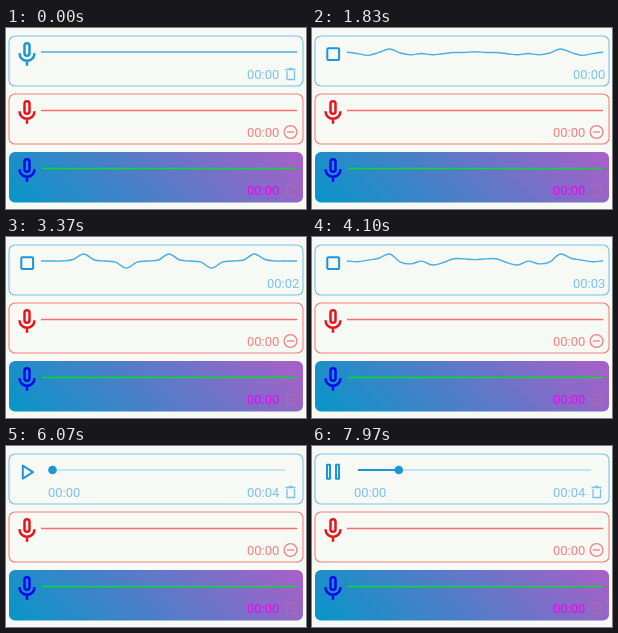
These frames come from a looping animation (300 px wide and 181 px high, 8 s). An HTML page:

```html
<!DOCTYPE html>
<html lang="en">
<head>
<meta charset="utf-8">
<title>Voice recorder</title>
<style>
  html, body { margin: 0; width: 100%; height: 100%; overflow: hidden; background: #f6f9f4; }
  svg { display: block; width: 300px; height: 181px; }
  text { font: 13px Roboto, Arial, sans-serif; fill: var(--soft); }
  .icon { fill: none; stroke: var(--main); stroke-width: 2; }
  .small { fill: none; stroke: var(--soft); stroke-width: 1.3; }
  .line { fill: none; stroke: var(--line); stroke-width: 1.4; }
  .box { fill: none; stroke: var(--soft); stroke-width: 1.1; }
  .blue { --main: #1b97d8; --soft: #7cc2e8; --line: #4aaee0; }
  .red { --main: #e8141c; --soft: #f97f7f; --line: #fa6d6d; }
  .vivid { --main: #0808f0; --soft: #f400f4; --line: #08dc30; }
</style>
</head>
<body>
<svg viewBox="0 0 300 181">
  <defs>
    <linearGradient id="fade" gradientUnits="userSpaceOnUse" x1="64" y1="119" x2="236" y2="-53">
      <stop offset="0" stop-color="#0696c8"/>
      <stop offset="1" stop-color="#aa5fc8"/>
    </linearGradient>
    <g id="mic" class="icon" transform="translate(6 11.5) scale(1.25)">
      <rect x="10" y="3" width="4" height="10" rx="2"/>
      <path d="M6 11a6 6 0 0 0 12 0M12 17v4"/>
    </g>
    <path id="trash" d="M279.5 41.5h10M283 40.5h3.5M281 43v8.5h7.5V43"/>
  </defs>

  <g class="blue">
    <rect class="box" x="3" y="8" width="294" height="50" rx="6"/>
    <use id="idleMic" href="#mic"/>
    <rect id="stop" class="icon" x="15.3" y="20.3" width="11.8" height="11.8" rx="1"/>
    <path id="play" class="icon" d="M16.8 19.6v13L27 26.1z" stroke-linejoin="round"/>
    <path id="pause" class="icon" stroke-width="1.7" stroke-linejoin="round" d="M15 18.8h3v14h-3zM24 18.8h3v14h-3z"/>
    <path id="wave" class="line"/>
    <g id="slider">
      <path d="M46 24H279" stroke="#8fcdec" stroke-width="1.2"/>
      <path id="played" stroke="#1b97d8" stroke-width="2"/>
      <circle id="knob" cy="24" r="4.3" fill="#1b97d8"/>
      <text id="position" x="42" y="51"></text>
    </g>
    <text id="clock" y="51"></text>
    <use id="bin" class="small" href="#trash"/>
  </g>

  <g class="red" transform="translate(0 58)">
    <rect class="box" x="3" y="8" width="294" height="50" rx="6"/>
    <use href="#mic"/>
    <path class="line" d="M35 24.5H291"/>
    <text x="241" y="51">00:00</text>
    <g class="small">
      <circle cx="284.5" cy="46" r="6.4"/>
      <path d="M281 46h7"/>
    </g>
  </g>

  <g class="vivid" transform="translate(0 116)">
    <rect x="3" y="8" width="294" height="50.5" rx="6" fill="url(#fade)"/>
    <use href="#mic"/>
    <path class="line" d="M36 24.5H291"/>
    <text x="241" y="51">00:00</text>
    <use class="small" href="#trash" style="--soft:#b566ae"/>
  </g>
</svg>

<script>
const LOOP = 8000, RECORD = 970, STOP = 5770, PLAY = 7140;
const LENGTH = STOP - RECORD;
const $ = id => document.getElementById(id);
const show = (id, on) => { $(id).style.display = on ? '' : 'none'; };
const clockText = ms => '00:' + String(Math.floor(ms / 1000)).padStart(2, '0');

// Left half of the waveform as offsets below the baseline; the right half mirrors it.
const flat = Array(13).fill(0);
const poses = [
  [RECORD, flat],
  [1200, flat.map((_, i) => i % 2 ? 1.5 : 0.2)],
  [2430, [0.4, 1.6, 7, 0, -7, 0, 6.5, 2, 4, 1.4, 2, 0, -2]],
  [3370, [0, 0, 0, -1.5, -7, -1, 0, 1.2, 7, 1.2, 0, -1, -7]],
  [4830, [0, 0.4, -2.6, -1, -6, 0, 5, 2.2, 1.5, -1, -5, 0, 4.4]],
  [STOP, flat]
];

function halfWave(time) {
  const k = poses.findIndex(([end]) => time < end);
  const [start, from] = poses[k - 1], [end, to] = poses[k];
  const u = (time - start) / (end - start);
  const ease = u * u * (3 - 2 * u);
  const wobble = k > 1 ? 3 * Math.sin(Math.PI * u) : 0;
  return from.map((y, i) => y + (to[i] - y) * ease
    + wobble * Math.min(1, i / 3) * Math.sin(i * 1.6 + time / 110) * Math.cos(time / 170));
}

function wavePath(time) {
  const half = halfWave(time);
  const at = i => 24 + half[12 - Math.abs(12 - Math.max(0, Math.min(24, i)))];
  const step = 256 / 24;
  let path = `M35 ${at(0)}`;
  for (let i = 0; i < 24; i++) {
    const x = 35 + i * step;
    const y1 = at(i) + (at(i + 1) - at(i - 1)) / 6;
    const y2 = at(i + 1) - (at(i + 2) - at(i)) / 6;
    path += `C${x + step / 3} ${y1} ${x + step * 2 / 3} ${y2} ${x + step} ${at(i + 1)}`;
  }
  return path;
}

function draw(time) {
  const idle = time < RECORD;
  const done = time >= STOP;
  const recording = !idle && !done;
  const playing = time >= PLAY;

  show('idleMic', idle);
  show('stop', recording);
  show('play', done && !playing);
  show('pause', playing);
  show('wave', !done);
  show('slider', done);
  show('bin', !recording);

  $('wave').setAttribute('d', recording ? wavePath(time) : 'M35 24H291');
  $('clock').setAttribute('x', recording ? 261 : 241);
  $('clock').textContent = clockText(idle ? 0 : Math.min(time - RECORD, LENGTH));

  const elapsed = Math.max(0, time - PLAY);
  const x = 46.5 + 232.5 * elapsed / LENGTH;
  $('knob').setAttribute('cx', x);
  $('played').setAttribute('d', `M46 24H${x}`);
  $('position').textContent = clockText(elapsed);
}

const begin = performance.now();
function frame() {
  draw((performance.now() - begin) % LOOP);
  requestAnimationFrame(frame);
}
frame();
</script>
</body>
</html>
```
